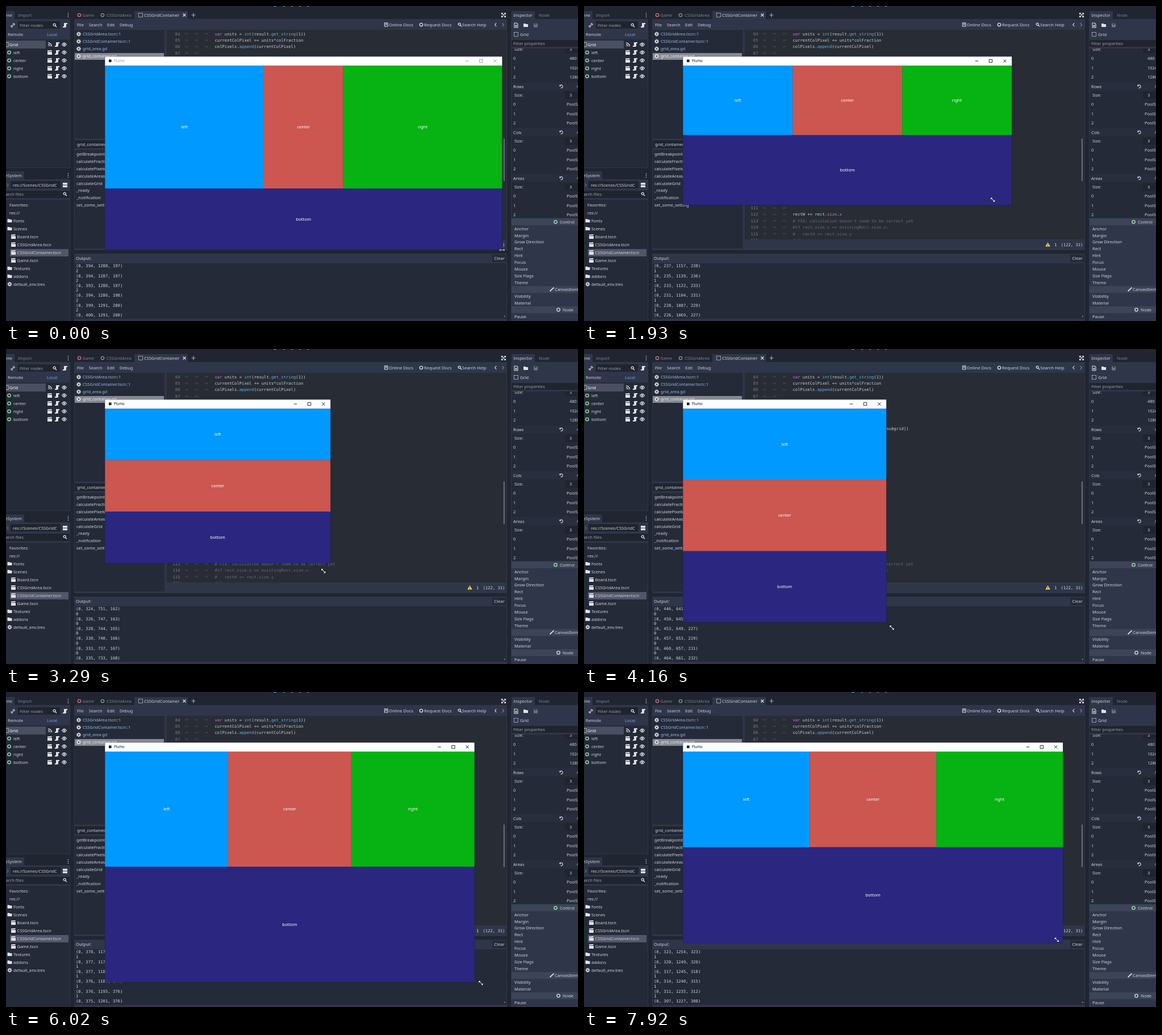
Animation of 1007x556 px, one loop 8000 ms. Source, as an HTML page:

```html
<!DOCTYPE html>
<html lang="en">
<head>
<meta charset="utf-8">
<title>Resizable grid layout</title>
<style>
html, body { margin: 0; width: 100%; height: 100%; overflow: hidden; background: #202531; }
svg { display: block; width: 1007px; height: 556px; }
text { font: 7.45px "Noto Sans", "Open Sans", sans-serif; fill: #cfd3da; white-space: pre; }
.mono { font: 7.2px "DejaVu Sans Mono", monospace; }
.cell { font-size: 7.6px; fill: #fff; text-anchor: middle; }
</style>
</head>
<body>
<svg id="stage" viewBox="0 0 1007 556"></svg>
<script>
const BASE = '#2f3649', DARK = '#242a38', FIELD = '#20242f', DIM = '#7d8390', LIGHT = '#e0e2e6', GREEN = '#a5efac';
const parts = [];
const add = s => parts.push(s);

// y is the middle of the line
const text = (x, y, s, o = {}) => add(`<text x="${x}" y="${y + 2.7}" class="${o.mono ? 'mono' : ''}" style="` +
  `${o.fill ? `fill:${o.fill};` : ''}${o.size ? `font-size:${o.size}px;` : ''}text-anchor:${o.anchor || 'start'}">${s}</text>`);
const rect = (x, y, x2, y2, fill) => add(`<rect x="${x}" y="${y}" width="${x2 - x}" height="${y2 - y}" fill="${fill}"/>`);
const icon = (x, y, d, color = LIGHT, filled = false, w = 1) => add(`<path transform="translate(${x} ${y})" d="${d}" ` +
  (filled ? `fill="${color}" fill-rule="evenodd"/>` : `fill="none" stroke="${color}" stroke-width="${w}"/>`));
const ring = (x, y, c = GREEN) => add(`<circle cx="${x}" cy="${y}" r="2.7" fill="none" stroke="${c}" stroke-width="1.3"/>`);

const film = (x, y) => icon(x, y, 'M-4-1H4V4H-4ZM-4-3.6L3.4-4 3.6-2-4-1.6Z', LIGHT, true);
const script = (x, y) => icon(x, y, 'M-2-4H4V-2H2V2Q2 4 0 4H-4V2H-2Z', LIGHT, true);
const eye = (x, y) => icon(x, y, 'M-4 0Q0-5.6 4 0Q0 5.6-4 0ZM-1.1 0A1.1 1.1 0 1 0 1.1 0A1.1 1.1 0 1 0-1.1 0', LIGHT, false, 1.2);
const folder = (x, y) => icon(x, y, 'M-4-3H-.5L.5-2H4V3H-4Z', LIGHT, true);
const lens = (x, y) => icon(x, y, 'M-2.8-.8A2 2 0 1 0 1.2-.8A2 2 0 1 0-2.8-.8M.8 1L3.2 3.2', LIGHT, false, 1.3);
const gear = (x, y) => {
  icon(x, y, 'M0-4V4M-4 0H4M-2.7-2.7L2.7 2.7M2.7-2.7L-2.7 2.7', LIGHT, false, 1.4);
  add(`<circle cx="${x}" cy="${y}" r="2" fill="${DARK}" stroke="${LIGHT}" stroke-width="1.4"/>`);
};
const dots = (x, y) => icon(x, y, 'M-.7-4h1.4v1.6h-1.4zM-.7-.8h1.4v1.6h-1.4zM-.7 2.4h1.4v1.6h-1.4z', '#b9bdc6', true);
const reload = (x, y) => icon(x, y, 'M-2.6-2.8V-.8H-.6M-2.4-1A2.6 2.6 0 1 1-1 2.4', LIGHT, false, 1.1);
const dashed = (x, y) => add(`<rect x="${x - 3.5}" y="${y - 3.5}" width="7" height="7" fill="none" stroke="${LIGHT}" stroke-dasharray="1.4 1"/>`);

function sceneDock() {
  rect(0, 9, 15, 23, BASE);
  rect(0, 23, 113, 286, BASE);
  rect(0, 59, 112, 285, DARK);
  text(11, 16, 'Scene', { anchor: 'end' });
  text(21, 16, 'Import', { fill: DIM });
  dots(109.5, 16);
  icon(12, 34, 'M-1 1L1-1M0-2L1.5-3.3L3.3-1.5L2 0M0 2L-1.5 3.3L-3.3 1.5L-2 0', LIGHT, false, 1.1);
  rect(21, 27, 95, 40, FIELD);
  text(24, 34, 'Filter nodes', { fill: '#9aa0ab' });
  lens(86, 34);
  script(104, 34);
  text(3, 50, 'Remote');
  text(72, 50, 'Local', { fill: '#70a9f5' });
  rect(0, 61, 70, 75, '#4a5061');
  dashed(1, 68);
  text(6, 68, 'Grid', { fill: '#fff' });
  icon(77, 68, 'M-3-3.2A6.4 6.4 0 0 1 3.4 3.2M-3-.4A3.6 3.6 0 0 1 .6 3.2M-3 2.4h1.2', LIGHT, false, 1.3);
  ['left', 'center', 'right', 'bottom'].forEach((s, i) => {
    const y = 82 + 14 * i;
    ring(5.5, y);
    text(13, y, s);
    film(77, y);
  });
  for (let y = 68; y < 130; y += 14) { script(90, y); eye(102.5, y); }
}

function fileDock() {
  rect(0, 292, 32, 306, BASE);
  rect(0, 306, 113, 556, BASE);
  text(28, 299, 'FileSystem', { anchor: 'end' });
  dots(109.5, 299);
  icon(3, 316, 'M-1-2.5L1 0L-1 2.5', DIM);
  rect(8, 309, 96, 322, FIELD);
  text(12, 316, 'res://Scenes/CSSGridC');
  icon(104, 316, 'M-4-4H4V-.6H-4ZM-4 .6H4V4H-4Z', LIGHT, true);
  rect(0, 326, 112, 339, FIELD);
  text(31, 332, 'Search files', { anchor: 'end', fill: '#9aa0ab' });
  lens(104, 332);
  rect(0, 342, 112, 556, DARK);
  rect(7, 429, 110, 442, '#50576a');
  const rows = [[6, 'Favorites:'], [6, 'res://'], [13, 'Fonts', folder], [13, 'Scenes', folder], [19.5, 'Board.tscn', film],
    [19.5, 'CSSGridArea.tscn', film], [19.5, 'CSSGridContainer.tscn', film], [19.5, 'Game.tscn', film],
    [13, 'Textures', folder], [13, 'addons', folder], [13, 'default_env.tres', gear]];
  rows.forEach(([x, s, draw], i) => {
    const y = 351 + 14 * i;
    if (draw) draw(x - 6.5, y);
    text(x, y, s);
  });
}

function codeArea() {
  const c = (fill, s) => `<tspan fill="${fill}">${s}</tspan>`;
  const kw = s => c('#c678dd', s), fn = s => c('#61afef', s), note = s => c('#666b76', s);
  const size = k => '.' + kw('size') + '.' + kw(k);
  rect(283, 42, 881, 412, '#282c34');
  add('<clipPath id="codeClip"><rect x="283" y="42" width="598" height="370"/></clipPath><g clip-path="url(#codeClip)">');
  const lines = {
    84: kw('var') + ' units = ' + c('#56b6c2', 'int') + '(result.' + fn('get_string') + '(1))',
    85: 'currentColPixel += units*colFraction',
    86: 'colPixels.' + fn('append') + '(currentColPixel)',
    87: '',
    109: kw('var') + ' rectW = existingRect' + size('x'),
    110: kw('var') + ' rectH = existingRect' + size('y'),
    111: '',
    112: 'rectW += rect' + size('x'),
    113: note("# FIX: calculation doesn't seem to be correct yet"),
    114: note('#if rect.size.x == existingRect.size.x:'),
    115: note('#   rectH += rect.size.y'),
    116: note('#else:')
  };
  for (const n in lines) {
    const y = 49 + (n - 84) * 11.385;
    text(306.5, y, n, { mono: true, fill: '#767c88', anchor: 'end' });
    for (let k = 0; k < (n == 87 ? 2 : 3); k++) icon(318 + 17.4 * k, y, 'M-1.8-1.8V1.8M-1.8 0H1.8M1.8-1.8V1.8', '#4c515c', false, .7);
    text(367.5, y, lines[n], { mono: true, fill: '#c9ced6' });
  }
  text(571.5, 140, 'subgrid])', { mono: true, fill: '#c9ced6', anchor: 'end' });
  add('</g>');
  rect(875.8, 234, 878, 309, '#666b78');
  icon(816.5, 421, 'M0-3.8L4.2 3.6H-4.2ZM-.5-1.4V1.3H.5V-1.4ZM-.5 2V3H.5V2Z', '#ffdd65', true);
  text(828, 421, '1', { mono: true, fill: '#ffdd65' });
  text(839.5, 421, '(122, 31)', { mono: true });
}

function scriptPanel() {
  rect(226, 9, 320, 23, BASE);
  rect(120, 23, 882, 431, BASE);
  ring(129, 16, '#e0757c');
  text(134.5, 16, 'Game', { fill: DIM });
  ring(170, 16, '#6fa877');
  text(177, 16, 'CSSGridArea', { fill: DIM });
  dashed(237, 16);
  text(243, 16, 'CSSGridContainer');
  icon(314, 16, 'M-2.5-2.5L2.5 2.5M2.5-2.5L-2.5 2.5', LIGHT, false, 1.2);
  icon(330, 16, 'M-3.5 0H3.5M0-3.5V3.5', '#a8adb7', false, 1.2);
  icon(876, 16, 'M-3.5-1V-3.5H-1M1-3.5H3.5V-1M3.5 1V3.5H1M-1 3.5H-3.5V1M-3-3L3 3M3-3L-3 3', LIGHT, false, 1.1);
  [[125, 'File'], [146, 'Search'], [178, 'Edit'], [200, 'Debug']].forEach(([x, s]) => text(x, 33, s));
  [[674, 'Online Docs'], [736, 'Request Docs'], [803, 'Search Help']].forEach(([x, s]) => text(x, 33, s, { size: 7.6 }));
  icon(669, 33, 'M-2.5-3.3H3V3H-2.5ZM-1-1.5H1.5M-1 0H1.5', LIGHT, false, 1.1);
  ring(731, 33, LIGHT);
  lens(799, 33);
  icon(862, 33, 'M1.2-3L-1.2 0L1.2 3', LIGHT, false, 1.2);
  icon(875, 33, 'M-1.2-3L1.2 0L-1.2 3', '#858b98', false, 1.2);

  rect(121, 42, 279, 234, DARK);
  rect(121, 83, 278, 95, '#858992');
  ['CSSGridArea.tscn::1', 'CSSGridContainer.tscn::1', 'grid_area.gd', 'grid_container.gd'].forEach((s, i) => {
    gear(128, 49.5 + 13 * i);
    text(135, 49.5 + 13 * i, s, { fill: i < 3 ? '#9dbbe2' : '#eceef2', size: 7.3 });
  });
  rect(121, 237, 279, 251, FIELD);
  text(125, 244, 'grid_container.gd');
  rect(121, 254, 279, 428, DARK);
  ['getBreakpoint', 'calculateFractions', 'calculatePixels', 'calculateAreas', 'calculateGrid', '_ready', '_notification', 'set_some_setting']
    .forEach((s, i) => text(124, 261 + 12.95 * i, s));
  codeArea();

  rect(120, 437, 882, 556, BASE);
  rect(121, 454, 881, 552, DARK);
  text(123, 445, 'Output:', { size: 7.6 });
  rect(856, 438.5, 881, 452, DARK);
  text(868.5, 445, 'Clear', { anchor: 'middle', size: 7.7 });
  icon(878, 548, 'M-1.2-.8H1.2L0 .8Z', LIGHT, true);
}

function inspector() {
  rect(890, 9, 931, 23, BASE);
  rect(889, 23, 1007, 556, BASE);
  text(893.5, 16, 'Inspector');
  text(938, 16, 'Node', { fill: DIM });
  icon(898, 34, 'M-3-4H1L3-2V4H-3ZM0-1V3M-2 1H2', LIGHT, false, 1.1);
  folder(915, 34);
  icon(932.5, 34, 'M-3.5-3.5H2.5L3.5-2.5V3.5H-3.5ZM-1.5-3V-1H1.5V-3Z', '#6d7380', true);
  dashed(898, 50);
  text(905, 50, 'Grid');
  rect(890, 60, 1007, 72, FIELD);
  text(893, 66, 'Filter properties', { fill: '#9aa0ab' });
  rect(890, 75, 1007, 374, DARK);
  add('<clipPath id="listClip"><rect x="889" y="75" width="118" height="300"/></clipPath><g clip-path="url(#listClip)">');
  [['', 61], ['Rows', 142], ['Cols', 223], ['Areas', 304]].forEach(([name, y], i) => {
    rect(890, y - 7, 1007, y + 7, '#282e3d');
    text(893, y, name);
    reload(977.5, y);
    icon(1006, y, 'M-1 2L1-2', '#70a9f5');
    rect(984, y + 9, 1007, y + 22, FIELD);
    text(895, y + 15.5, 'Size:');
    text(992, y + 15.5, '3');
    for (let k = 0; k < 3; k++) {
      text(893, y + 31.5 + 16.3 * k, k);
      text(i ? 987 : 992, y + 31.5 + 16.3 * k, i ? 'PoolStringArray' : [480, 1024, 1280][k]);
    }
  });
  add('</g>');
  const rows = ['*Control', 'Anchor', 'Margin', 'Grow Direction', 'Rect', 'Hint', 'Focus', 'Mouse', 'Size Flags', 'Theme',
    '*CanvasItem', 'Visibility', 'Material', '*Node', 'Pause'];
  const heads = { Control: 975, CanvasItem: 966, Node: 980 };
  rows.forEach((s, i) => {
    const y = 381 + 11.93 * i, head = s[0] === '*' && s.slice(1);
    if (!head) return text(895, y, s);
    rect(890, y - 6, 1007, y + 6, '#3c4457');
    text(heads[head], y, head);
    if (head === 'CanvasItem') icon(961, y, 'M3.5-3.5L-1 .8M-1 .5L-3.3 3.3', LIGHT, false, 1.8);
    else ring(heads[head] - 7.5, y, head === 'Node' ? LIGHT : GREEN);
  });
}

sceneDock();
fileDock();
scriptPanel();
inspector();
rect(471, 0, 476, 1, '#5f9bea');
for (let x = 488; x < 535; x += 14) rect(x, 0, x + 3, .8, '#b9bdc6');

const LEFT = 174.3, TOP = 105.5, SCALE = .5415;
add('<clipPath id="logClip"><rect x="121" y="454" width="755" height="98"/></clipPath><g id="log" clip-path="url(#logClip)">');
for (let i = 0; i < 6; i++) {
  if (i) text(123, 449.8 + 17.33 * i, '', { mono: true });
  text(123, 458.5 + 17.33 * i, '', { mono: true });
}
add('</g>');
const cells = [['left', '#0099ff'], ['center', '#cc5650'], ['right', '#06b312'], ['bottom', '#2b2780']];
add(`<rect id="back" x="${LEFT}" y="89.3" fill="#2b2780" stroke="#000" stroke-opacity=".35"/>
  <rect id="bar" x="${LEFT}" y="89.3" height="16.2" fill="#fff"/><rect x="181" y="94.5" width="4.6" height="4.6" fill="#222"/>
  <text id="title" x="190" y="99.4" style="font-size:6.2px">Plumo</text>
  <path id="buttons" d="M-64.6 97h5.6M-40 94.3h5.4v5.4h-5.4zM-15.2 94.3l5.4 5.4M-9.8 94.3l-5.4 5.4" fill="none" stroke-width=".9"/>`);
cells.forEach(([s, fill]) => add(`<g class="pane"><rect fill="${fill}"/><text class="cell">${s}</text></g>`));
const arrow = 'M-4.5 0H4.5M-2.7-1.8L-4.6 0L-2.7 1.8M2.7-1.8L4.6 0L2.7 1.8';
add(`<g id="cursor" fill="none"><path d="${arrow}" stroke="#000" stroke-width="2.2"/><path d="${arrow}" stroke="#fff"/></g>`);
document.getElementById('stage').innerHTML = parts.join('');

// Screen updates: single times, or [first, last, count]
const steps = [0, 80, 260, [480, 620, 3], 780, 920, 1070, [1220, 1350, 2], 1490, 1630, 1780, 1930, [2070, 2310, 3], 2450,
  [2590, 3390, 8], [3480, 4160, 8], 4270, [4380, 5130, 8], [5260, 5880, 6], [6020, 6540, 5], [6680, 6920, 3], [7060, 7130, 2],
  7400, [7560, 7620, 2], 7770, 7920]
  .flatMap(s => s.length ? Array.from({ length: s[2] }, (_, i) => s[0] + (s[1] - s[0]) * i / (s[2] - 1)) : s);

// Time, inner width and height of the dragged window
const path = [[0, 1291, 600], [480, 1291, 600], [620, 1293, 598], [780, 1297, 592], [920, 1294, 584], [1070, 1288, 572],
  [1220, 1274, 550], [1272, 1266, 541], [1350, 1244, 524], [1490, 1233, 518], [1630, 1202, 498], [1780, 1157, 475],
  [1930, 1069, 453], [2070, 1010, 436], [2310, 932, 424], [2338, 919, 424], [2422, 899, 424], [2450, 888, 425],
  [2600, 850, 431], [3000, 775, 462], [3390, 716, 520], [3800, 645, 608], [3950, 632, 642], [4063, 641, 670],
  [4160, 661, 696], [4300, 677, 712], [4600, 750, 755], [5000, 872, 774], [5130, 928, 774], [5260, 978, 774],
  [5410, 1037, 777], [5630, 1118, 766], [5880, 1172, 756], [6020, 1201, 751], [6170, 1222, 753], [6280, 1255, 752],
  [6680, 1333, 752], [6920, 1350, 752], [7070, 1357, 752], [7550, 1356, 752], [7620, 1298, 700], [7770, 1259, 652],
  [7920, 1235, 623], [7950, 1227, 615], [8070, 1215, 612]];

function sizeAt(t) {
  const i = Math.max(1, path.findIndex(p => p[0] >= t));
  const a = path[i - 1], b = path[i], u = (t - a[0]) / (b[0] - a[0]);
  return [1, 2].map(k => Math.round(a[k] + (b[k] - a[k]) * u));
}
const kindOf = w => w >= 1280 ? 2 : w >= 1024 ? 1 : 0;
const splitOf = (w, h) => Math.floor(kindOf(w) === 1 ? h / 2 : h * 2 / 3);

// Every resize event prints the layout kind and the bottom area
const events = [[1288, 591], [1287, 591], [1286, 590], [1286, 592], [1291, 599], [1291, 600]];
const logs = steps.map((t, k) => {
  const from = k ? steps[k - 1] : 0, lead = t > 7500 ? 30 : 0;
  for (let i = 1; i <= 5; i++) {
    const s = sizeAt(from + (t - from) * i / 5 + lead);
    if (String(s) !== String(events[events.length - 1])) events.push(s);
  }
  return events.slice(-6);
});

const $ = id => document.getElementById(id);
const set = (el, o) => { for (const k in o) el.setAttribute(k, o[k]); };
const panes = [...document.querySelectorAll('.pane')], logRows = [...$('log').children];

function place(pane, x, y, w, h) {
  pane.style.display = w ? '' : 'none';
  set(pane.firstChild, { x: LEFT + x * SCALE, y: TOP + y * SCALE, width: w * SCALE, height: h * SCALE });
  set(pane.lastChild, { x: LEFT + (x + w / 2) * SCALE, y: TOP + (y + h / 2) * SCALE + 2.4 });
}

function draw(k) {
  const t = steps[k], [w, h] = sizeAt(t), kind = kindOf(w), y = splitOf(w, h), active = t >= 480;
  const right = LEFT + w * SCALE;
  if (kind) {
    const a = w * (kind === 2 ? 2 / 5 : 1 / 3), b = w - a;
    place(panes[0], 0, 0, a, y);
    place(panes[1], a, 0, b - a, y);
    place(panes[2], b, 0, a, y);
  } else {
    place(panes[0], 0, 0, w, h / 3);
    place(panes[1], 0, h / 3, w, h / 3);
    place(panes[2], 0, 0, 0, 0);
  }
  place(panes[3], 0, y, w, h - y);
  set($('back'), { width: w * SCALE, height: TOP - 89.3 + h * SCALE });
  set($('bar'), { width: w * SCALE });
  $('title').style.fill = active ? '#111' : '#999';
  set($('buttons'), { transform: `translate(${right + 0.1} 0)`, stroke: active ? '#111' : '#999' });

  const [cw, ch] = sizeAt(t + 150);
  const turn = t < 80 ? 0 : 45;
  set($('cursor'), { transform: `translate(${LEFT + cw * SCALE} ${TOP + ch * SCALE + (turn && t < 480 ? 1.5 : .3)}) rotate(${turn})` });

  const lines = logs[k].flatMap(([ew, eh]) => {
    const ey = splitOf(ew, eh);
    return [kindOf(ew), `(0, ${ey}, ${ew}, ${eh - ey})`];
  }).slice(1);
  logRows.forEach((el, i) => { el.textContent = lines[i]; });
}

let shown = -1;
const start = performance.now();
function tick() {
  const t = Math.max(0, performance.now() - start) % 8000;
  let k = steps.length - 1;
  while (steps[k] > t) k--;
  if (k !== shown) draw(shown = k);
  requestAnimationFrame(tick);
}
tick();
</script>
</body>
</html>
```
